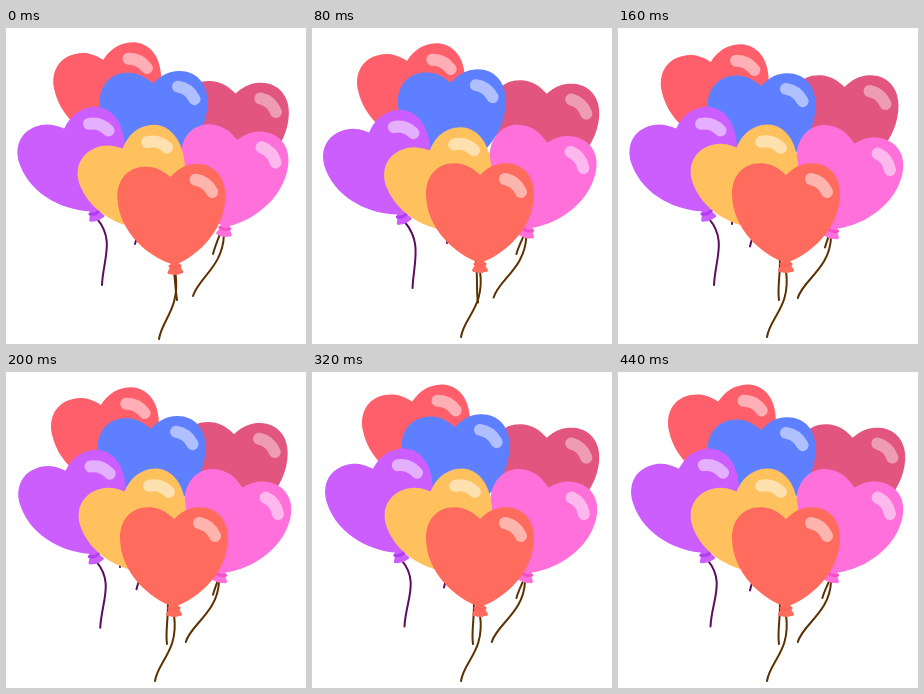
Animation of 300 by 316 pixels, one loop 0.48 s. Source, as an HTML page with a canvas:

```html
<!DOCTYPE html>
<html lang="en">
<head>
<meta charset="utf-8">
<title>Balloons</title>
<style>
  html, body { margin: 0; width: 100%; height: 100%; overflow: hidden; background: #fff; }
  canvas { display: block; }
</style>
</head>
<body>
<canvas id="stage" width="300" height="316"></canvas>
<script>
const ctx = document.getElementById('stage').getContext('2d');
const STEP = 40;
const STEPS = 12;
const BROWN = '#5c3000';
const PLUM = '#5e0c5e';

const ramp = (s, from, to) => Math.min(1, Math.max(0, (s - from) / (to - from)));
const hump = (s, start, top, fall, end) => Math.min(ramp(s, start, top), ramp(s, end, fall));
const easeOut = u => 1 - (1 - u) ** 2;

// home: heart tip x, y and tilt in degrees; sway: offset of home at a step.
// end: resting end of the string; trail: how far the end follows sideways.
// bend: offsets of the string's control points from its start and end.
const balloons = [
  {
    color: '#ff5f6a', knot: '#f04c5c', string: PLUM,
    home: [115.5, 118, -12], end: [114, 194], trail: 0, bend: [0, 25, 1, -14],
    sway(s) {
      const lift = hump(s, 0, 1, 1, 2) + ramp(s, 6, 8);
      const sink = hump(s, 1, 3, 4, 6);
      return [1.5 * lift - 4.5 * sink, 2 * sink - 2 * lift, lift];
    }
  },
  {
    color: '#e2557f', knot: '#cf436e', string: BROWN, shine: 0.42,
    home: [226.5, 153.5, 2], end: [207, 226], trail: -1.3, bend: [0, 20, 4, -16],
    sway(s) {
      const lean = hump(s, 0, 2, 2, 4) + ramp(s, 6, 8);
      const rise = hump(s, 2, 4, 4, 6);
      return [2 * lean, -6.5 * rise, 2 * lean - 2 * rise];
    }
  },
  {
    color: '#5e7fff', knot: '#4a6af0', string: PLUM,
    home: [150, 143.5, -2], end: [129, 216], trail: -1, bend: [0, 20, 3, -14],
    sway(s) {
      const cycle = s % 7;
      const lean = hump(cycle, 0, 2, 2, 6);
      const sink = hump(cycle, 2, 4, 4, 6);
      return [-6 * lean, 3 * sink - lean, -1.5 * lean];
    }
  },
  {
    color: '#cc5eff', knot: '#b03cf4', string: PLUM,
    home: [88.3, 183.3, -20], end: [96, 257], trail: 3.5, bend: [18, 21, 1, -25],
    sway(s) {
      const dip = hump(s, 0, 1, 2, 4);
      const rise = ramp(s, 4, 6);
      return [1.3 * dip - rise, 3 * dip - 2.5 * rise, 2.5 * rise - 1.7 * dip];
    }
  },
  {
    color: '#ff70db', knot: '#f44fc8', string: BROWN,
    home: [219, 199, 8], end: [187, 268], trail: 1.8, bend: [-1, 32, 5, -18],
    sway(s) {
      const turn = easeOut(ramp(s, 0, 4));
      return [-4 * turn, 2 * turn, 6 * turn];
    }
  },
  {
    color: '#ffc15e', knot: '#f5ad45', string: BROWN,
    home: [152.5, 201, -24], end: [171, 272], trail: 10, bend: [14, 16, -3, -18],
    sway(s) {
      const turn = ramp(s, 0, 4);
      return [-turn, 2.5 * hump(s, 0, 2, 2, 4), 2 * turn];
    }
  },
  {
    color: '#ff6b5c', knot: '#ff6257', string: BROWN,
    home: [169, 237, -3], end: [153, 311], trail: 4, bend: [5, 36, 3, -20],
    sway(s) {
      const turn = ramp(s, 0, 2);
      return [-turn, -2 * turn, 3 * turn];
    }
  }
];

const heart = new Path2D(
  'M0-88C-10-97.7-18-99.7-26-99.7C-43-99.7-54-87-54-69.5C-54-34-24-8 0 0' +
  'C24-8 54-34 54-69.5C54-87 43-99.7 26-99.7C18-99.7 10-97.7 0-88Z');
const knot = new Path2D('M-4-3L4-3Q5 3 8 7Q8 9 5 9Q0 11-5 9Q-8 9-8 7Q-5 3-4-3Z');
const band = new Path2D('M-5 1Q0 4 5 1');
const shine = new Path2D('M25-84Q36-82 41-71');

function strokeWith(color, width, path) {
  ctx.strokeStyle = color;
  ctx.lineWidth = width;
  ctx.stroke(path);
}

function drawString({ string, bend }, x, y, angle, endX, endY) {
  const startX = x - 8 * Math.sin(angle);
  const startY = y + 8 * Math.cos(angle);
  const path = new Path2D();
  path.moveTo(startX, startY);
  path.bezierCurveTo(startX + bend[0], startY + bend[1],
    endX + bend[2], endY + bend[3], endX, endY);
  strokeWith(string, 2, path);
}

function drawBalloon(balloon, step) {
  const { home, end, trail } = balloon;
  const [dx, dy, turn] = balloon.sway(step);
  const x = home[0] + dx;
  const y = home[1] + dy;
  const angle = (home[2] + turn) * Math.PI / 180;
  drawString(balloon, x, y, angle, end[0] + trail * dx, end[1] + dy);

  ctx.save();
  ctx.translate(x, y);
  ctx.rotate(angle);
  ctx.fillStyle = balloon.color;
  ctx.fill(heart);
  ctx.fill(knot);
  strokeWith(balloon.knot, 3, band);
  strokeWith(`rgba(255, 255, 255, ${balloon.shine ?? 0.5})`, 12, shine);
  ctx.restore();
}

function render(now) {
  const step = Math.floor(now / STEP) % STEPS;
  ctx.fillStyle = '#fff';
  ctx.fillRect(0, 0, 300, 316);
  ctx.lineCap = 'round';
  balloons.forEach(balloon => drawBalloon(balloon, step));
}

const start = performance.now();
function tick() {
  render(performance.now() - start);
  requestAnimationFrame(tick);
}
tick();
</script>
</body>
</html>
```
